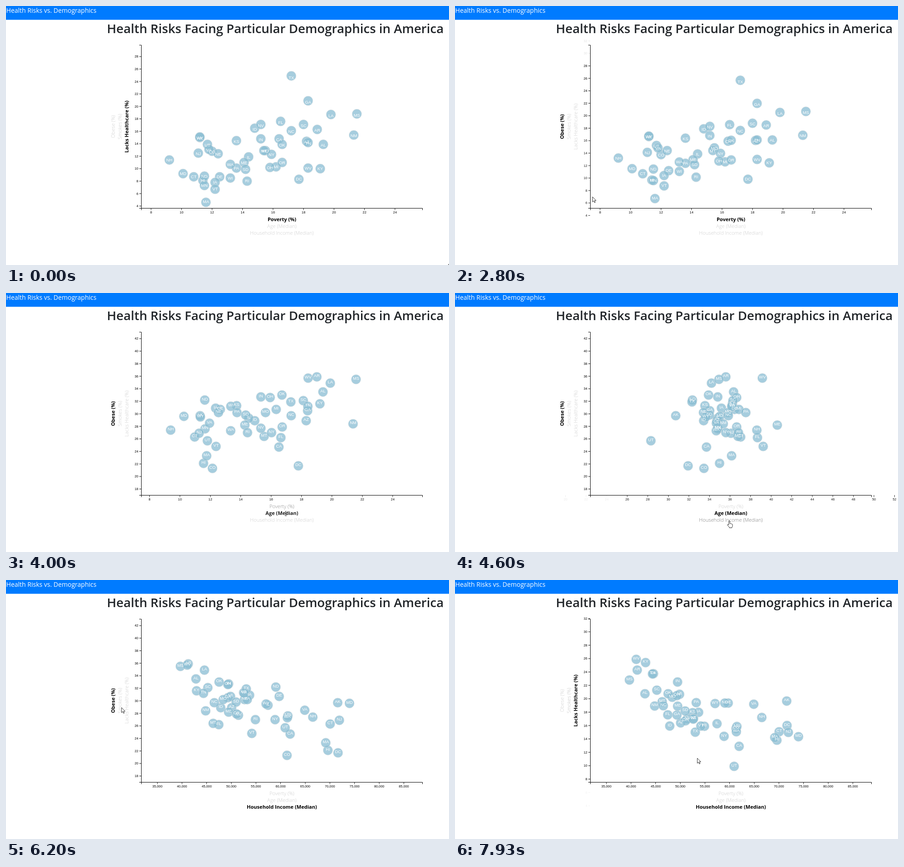
Write an HTML page that moves like this. It is 977x573 px and loops after 8 s.

```html
<!DOCTYPE html>
<html lang="en">
<head>
<meta charset="utf-8">
<title>Health Risks vs. Demographics</title>
<style>
html, body { margin: 0; width: 100%; height: 100%; overflow: hidden; background: #fff; }
svg { display: block; }
.head { font-family: "Open Sans", "Noto Sans", sans-serif; }
.nav { font-size: 14px; fill: #fff; }
.title { font-size: 27.65px; font-weight: 600; fill: #212529; }
.label { font: 300 11.1px "Open Sans", "Noto Sans", sans-serif; text-anchor: middle; }
.label.active { font-weight: 700; }
.tick text { font: 7.3px "Liberation Sans", Arial, sans-serif; }
.tick line, .domain { stroke: #000; fill: none; }
.tick line { stroke-width: .9; }
.state { fill: #89bdd3; stroke: #e3e3e3; stroke-width: .8; opacity: .75; }
.abbr { font: 9.4px "Liberation Sans", Arial, sans-serif; fill: #fff; text-anchor: middle; }
.cursor path { fill: #fff; stroke: #000; stroke-width: .8; stroke-linejoin: round; }
</style>
</head>
<body>
<svg id="stage" width="977" height="573" viewBox="0 0 977 573">
  <rect width="977" height="30.5" fill="#007bff"/>
  <text class="head nav" x="0.6" y="15.4">Health Risks vs. Demographics</text>
  <text class="head title" x="222.6" y="60">Health Risks Facing Particular Demographics in America</text>
  <svg id="chart" x="224" y="71" width="753" height="443" viewBox="224 71 753 443"></svg>
  <g class="cursor" id="cursor">
    <path id="arrow" d="M0 0V11.2L2.6 8.8L4.4 12.8L6.2 12L4.4 8.1H7.8Z"/>
    <path id="hand" d="M-1.2 9V1.2a1.2 1.2 0 0 1 2.4 0V6q1.2-.6 2 .5q1.3-.5 2 .6q1.8-.3 1.8 1.6V11q0 2-1.2 3.2V15.5H0V14.3L-4.3 9.3q0-1.4 1.3-1.2z"/>
    <path id="beam" style="fill:none" d="M-2-5h1.5l.5.5.5-.5H2M0-4.5V4.5M-2 5h1.5l.5-.5.5.5H2"/>
  </g>
</svg>
<script>
const LOOP = 8000, MOVE = 1000, FADE = 300;
const LEFT = 298.4, RIGHT = 918.4, TOP = 86, BOTTOM = 447;

const states = ('AL AK AZ AR CA CO CT DE DC FL GA HI ID IL IN IA KS KY LA ME MD MA MI MN MS MO ' +
  'MT NE NV NH NJ NM NY NC ND OH OK OR PA RI SC SD TN TX UT VT VA WA WV WI WY').split(' ');

const data = {
  poverty: [19.3, 11.2, 18.2, 18.9, 16.4, 12, 10.8, 12.5, 17.7, 16.5, 18.3, 11.4, 14.8, 14.4, 15.2, 12.2, 13.6,
    19.1, 19.8, 14.1, 10.1, 11.6, 16.2, 11.5, 21.5, 15.5, 15.4, 12.4, 15.2, 9.2, 11.1, 21.3, 15.9, 17.2,
    11.5, 15.8, 16.6, 16.6, 13.6, 14.3, 18, 14.2, 18.3, 17.2, 11.7, 12.2, 11.8, 13.2, 18.3, 13.2, 11.2],
  age: [38.6, 33.3, 36.9, 37.8, 36, 36.3, 40.5, 39.6, 33.8, 41.6, 36.1, 38.1, 35.9, 37.5, 37.4, 38.2, 36.2,
    38.5, 36.1, 44.1, 38.3, 39.4, 39.6, 37.9, 36.7, 38.5, 39.6, 36.2, 37.4, 42.5, 39.4, 37.2, 38.2, 38.3,
    35.1, 39.4, 36.2, 39.3, 40.7, 39.8, 38.7, 36.6, 38.6, 34.3, 30.5, 42.8, 37.7, 37.5, 41.9, 39.2, 36.6],
  income: [42830, 71583, 50068, 41262, 61933, 61303, 70048, 59716, 71648, 47463, 49321, 69592, 47861, 57444,
    49446, 53712, 52504, 42958, 44555, 49462, 73971, 69160, 49847, 61481, 39680, 48363, 46328, 52686, 51450,
    66532, 71919, 44803, 58878, 46556, 59029, 49308, 47529, 51075, 53234, 54891, 45238, 50979, 44361, 53035,
    60922, 54166, 64902, 61366, 41059, 52622, 57055],
  healthcare: [13.9, 15, 14.4, 16.3, 14.8, 12.8, 8.7, 8.7, 8.3, 17.6, 20.9, 8.1, 16.5, 11.9, 14.8, 7.8, 14.5,
    10, 18.7, 11, 9.2, 4.6, 10.3, 7.3, 18.8, 12.9, 12.9, 12.4, 17.1, 11.4, 12.5, 15.4, 12.3, 16.1,
    8.8, 10.2, 13.9, 11, 10.1, 8, 17.1, 9.9, 14.2, 24.9, 13.9, 6.7, 13.1, 10.7, 10.1, 8.5, 15.1],
  obesity: [33.5, 29.7, 28.9, 35.9, 24.7, 21.3, 26.3, 30.7, 21.7, 26.2, 30.5, 22.1, 28.9, 29.3, 32.7, 30.9, 31.3,
    31.6, 34.9, 28.2, 29.6, 23.3, 30.7, 27.6, 35.5, 30.2, 26.4, 30.2, 27.7, 27.4, 26.9, 28.4, 27, 29.7,
    32.2, 32.6, 33, 27.9, 30.2, 27, 32.1, 29.8, 31.2, 31.9, 25.7, 24.8, 28.5, 27.3, 35.7, 31.2, 29.5],
  smokes: [21.1, 19.9, 16.5, 24.7, 12.8, 15.7, 15.4, 19.9, 16.4, 17.6, 17.4, 14.1, 15.9, 16.5, 22.9, 18.5, 18.1,
    26.2, 24, 19.3, 14.6, 14.7, 21.2, 16.3, 23, 20.6, 19.9, 17.3, 17, 17.5, 15.1, 19.1, 14.5, 19.1,
    19.9, 21, 21.1, 17, 19.9, 16.3, 21.5, 18.6, 24.2, 14.5, 9.7, 16.4, 19.5, 15.3, 26.7, 17.4, 19.5]
};

// Axis selections: [click time, variable]
const xSteps = [[-MOVE, 'poverty'], [3871, 'age'], [5125, 'income']];
const ySteps = [[-MOVE, 'healthcare'], [2497, 'obesity'], [6479, 'smokes'], [7695, 'healthcare']];

// Labels: key, text, x, y, rotation, starting opacity, [time, new opacity]...
const labelSpecs = [
  ['poverty', 'Poverty (%)', 608.4, 476.3, 0, 1, [3871, .2]],
  ['age', 'Age (Median)', 608.4, 491.1, 0, .2, [3580, .6], [3871, 1], [5125, .2]],
  ['income', 'Household Income (Median)', 608.4, 505.9, 0, .2, [4430, .6], [5125, 1]],
  ['healthcare', 'Lacks Healthcare (%)', 269.6, 266.8, -90, 1, [2497, .2], [6700, .6], [7695, 1]],
  ['smokes', 'Smokes (%)', 254.9, 266.8, -90, .2, [6230, .6], [6479, 1], [7695, .2]],
  ['obesity', 'Obese (%)', 240.2, 266.8, -90, .2, [2150, .6], [2497, 1], [6479, .2]]
];

const cursorPath = [
  [0, 976, 571], [130, 976, 571], [330, 800, 500], [500, 600, 420], [620, 480, 402], [800, 357, 447],
  [930, 357, 447], [1250, 300, 400], [1500, 225, 345], [1700, 209, 312], [1800, 211, 330], [2000, 225, 276],
  [2130, 225, 276], [2200, 234, 266], [2520, 234, 266], [2650, 262, 340], [2800, 303, 422], [3000, 360, 470],
  [3300, 480, 499], [3600, 617, 488], [4130, 617, 488], [4300, 612, 500], [4450, 606, 512], [4560, 605, 504],
  [5130, 605, 504], [5300, 500, 480], [5500, 340, 420], [5600, 284.5, 380], [5930, 270, 330], [6270, 251, 270],
  [6530, 251, 270], [6800, 267, 280], [7695, 267, 280], [7800, 350, 320], [7930, 534, 394], [8000, 560, 405]
];
const cursorKinds = [
  [0, 'arrow'], [2150, 'hand'], [2497, 'beam'], [2540, 'arrow'], [3570, 'hand'], [3871, 'beam'], [4250, 'hand'],
  [5125, 'beam'], [5160, 'arrow'], [6230, 'hand'], [6479, 'beam'], [6560, 'hand'], [7695, 'arrow']
];

const $ = id => document.getElementById(id);
const chart = $('chart');
const clamp = u => Math.max(0, Math.min(1, u));
const lerp = (a, b, u) => a + (b - a) * u;
const cubicInOut = u => u < .5 ? 4 * u ** 3 : 1 - 4 * (1 - u) ** 3;
const easeOut = u => 1 - (1 - u) ** 2;

function add(parent, tag, attrs = {}, text = '') {
  const el = document.createElementNS('http://www.w3.org/2000/svg', tag);
  for (const k in attrs) el.setAttribute(k, attrs[k]);
  el.textContent = text;
  return parent.appendChild(el);
}

function makeScale(key, r0, r1) {
  const lo = Math.min(...data[key]) * .8, hi = Math.max(...data[key]) * 1.2;
  const step = key === 'income' ? 5000 : 2;
  const at = v => r0 + (v - lo) / (hi - lo) * (r1 - r0);
  const ticks = new Set();
  for (let v = Math.ceil(lo / step) * step; v <= hi; v += step) ticks.add(v);
  return { key, at, ticks };
}

const scales = {};
for (const k of ['poverty', 'age', 'income']) scales[k] = makeScale(k, LEFT, RIGHT);
for (const k of ['healthcare', 'obesity', 'smokes']) scales[k] = makeScale(k, BOTTOM, TOP);

const circles = states.map(() => add(chart, 'circle', { class: 'state', r: 10.6 }));
const abbrs = states.map(s => add(chart, 'text', { class: 'abbr' }, s));

function makeTicks(steps, vertical) {
  const values = new Set(steps.flatMap(s => [...scales[s[1]].ticks]));
  return [...values].map(value => {
    const el = add(chart, 'g', { class: 'tick' });
    add(el, 'line', vertical ? { x1: 294, x2: 298 } : { y1: 447, y2: 451.5 });
    add(el, 'text', vertical ? { x: 291.8, y: 2.5, 'text-anchor': 'end' } : { y: 459, 'text-anchor': 'middle' },
      value.toLocaleString('en-US'));
    return { el, value };
  });
}
const xTicks = makeTicks(xSteps, false), yTicks = makeTicks(ySteps, true);
add(chart, 'path', { class: 'domain', d: 'M294 86.5H298.5V447.5H294' });
add(chart, 'path', { class: 'domain', d: 'M298.5 451.5V447.5H918.5V451.5' });

const labels = labelSpecs.map(([key, text, x, y, turn, start, ...fades]) => ({
  key, start, fades,
  el: add(chart, 'text', { transform: `translate(${x} ${y}) rotate(${turn})` }, text)
}));

const lastBefore = (list, t) => list.findLastIndex(s => s[0] <= t);

function axisAt(steps, t) {
  const i = lastBefore(steps, t);
  return {
    from: scales[steps[Math.max(0, i - 1)][1]],
    to: scales[steps[i][1]],
    p: cubicInOut(clamp((t - steps[i][0]) / MOVE))
  };
}

const place = (axis, i) =>
  lerp(axis.from.at(data[axis.from.key][i]), axis.to.at(data[axis.to.key][i]), axis.p);

function drawTicks(ticks, { from, to, p }, vertical) {
  for (const { el, value } of ticks) {
    const alpha = lerp(+from.ticks.has(value), +to.ticks.has(value), p);
    const pos = lerp(from.at(value), to.at(value), p);
    el.setAttribute('opacity', alpha.toFixed(4));
    el.setAttribute('transform', vertical ? `translate(0 ${pos})` : `translate(${pos} 0)`);
  }
}

function drawCursor(t) {
  const i = Math.min(lastBefore(cursorPath, t), cursorPath.length - 2);
  const [t0, x0, y0] = cursorPath[i], [t1, x1, y1] = cursorPath[i + 1];
  const u = clamp((t - t0) / (t1 - t0));
  $('cursor').setAttribute('transform', `translate(${lerp(x0, x1, u)} ${lerp(y0, y1, u)})`);
  const kind = cursorKinds[lastBefore(cursorKinds, t)][1];
  for (const id of ['arrow', 'hand', 'beam']) $(id).style.display = id === kind ? '' : 'none';
}

function draw(t) {
  const x = axisAt(xSteps, t), y = axisAt(ySteps, t);
  // Abbreviations sit slightly low until the first y change.
  const sag = 1 - cubicInOut(clamp((t - ySteps[1][0]) / MOVE));
  states.forEach((_, i) => {
    const cx = place(x, i), cy = place(y, i);
    const v = data.healthcare[i], at = scales.healthcare.at;
    circles[i].setAttribute('cx', cx);
    circles[i].setAttribute('cy', cy);
    abbrs[i].setAttribute('x', cx);
    abbrs[i].setAttribute('y', cy + .7 + sag * (at(v * .98) - at(v)));
  });
  drawTicks(xTicks, x, false);
  drawTicks(yTicks, y, true);
  for (const { el, key, start, fades } of labels) {
    const alpha = fades.reduce((a, [at, target]) => lerp(a, target, easeOut(clamp((t - at) / FADE))), start);
    el.setAttribute('opacity', alpha);
    el.setAttribute('class', key === x.to.key || key === y.to.key ? 'label active' : 'label');
  }
  drawCursor(t);
}

const begin = performance.now();
function tick() {
  draw((performance.now() - begin) % LOOP);
  requestAnimationFrame(tick);
}
tick();
</script>
</body>
</html>
```
